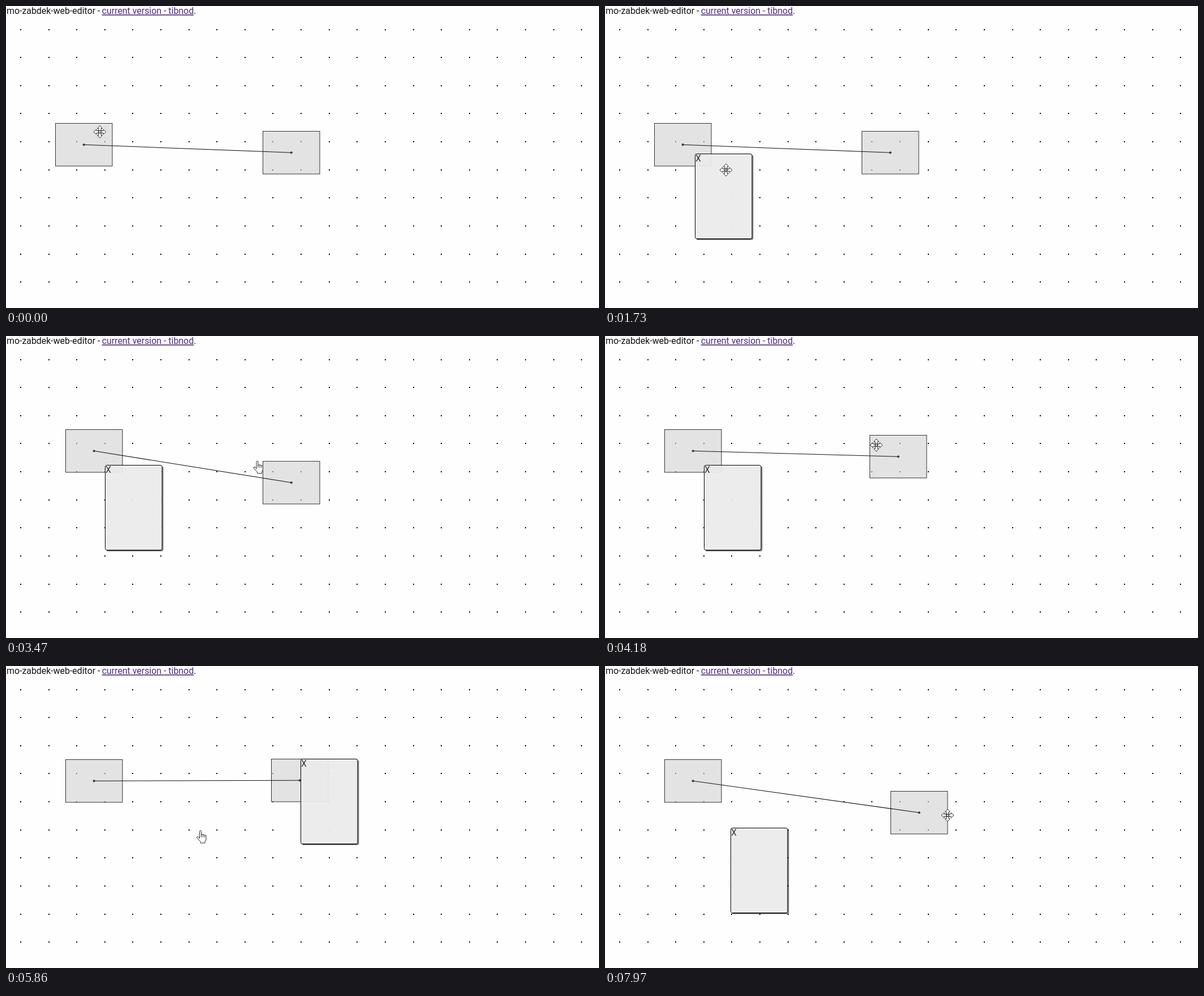
An HTML page for the animation above (8 s loop, 1049 px wide and 534 px high).

```html
<!DOCTYPE html>
<html lang="en">
<head>
<meta charset="utf-8">
<title>Box editor</title>
<style>
  html, body { margin: 0; width: 100%; height: 100%; overflow: hidden; background: #fefefe; }
  svg { display: block; width: 100%; height: 100%; }
  text { font: 15.9px Roboto, Arial, sans-serif; fill: #111; }
  .link { fill: #4f2a80; text-decoration: underline; }
  .box { fill: rgba(210, 210, 210, .6); stroke: #333; }
  .wire { stroke: #111; stroke-width: 1.1; }
  .end { fill: #333; }
  .shadow { fill: none; stroke: #222; stroke-width: 1.2; }
  .cursor path { fill: #fff; stroke: #2a2a33; stroke-linejoin: round; }
</style>
</head>
<body>
<svg viewBox="0 0 1049 534">
  <text x="1" y="14">mo-zabdek-web-editor -<tspan class="link" x="169.7">current version - tibnod</tspan>.</text>
  <path id="grid"/>
  <rect id="boxA" class="box" width="100.5" height="75.5"/>
  <rect id="boxB" class="box" width="100.5" height="75.5"/>
  <line id="wire" class="wire"/>
  <circle id="endA" class="end" r="2"/>
  <circle id="endB" class="end" r="2"/>
  <g id="panel">
    <path class="shadow" opacity=".4" d="M102.5 3.5V149Q102.5 152 99.5 152H3.5"/>
    <path class="shadow" opacity=".8" d="M101.5 2.5V148Q101.5 151 98.5 151H2.5"/>
    <rect width="100.5" height="150" rx="3" fill="rgba(235,235,235,.94)" stroke="#000"/>
    <text x=".5" y="13.5" style="fill:#333">X</text>
  </g>
  <g class="cursor">
    <path id="move"/>
    <g id="hand">
      <path d="M-1.5 14V1.5Q-1.5 0 0 0T1.5 1.5V8Q1.5 6.5 3 6.5T4.5 8Q4.5 7 6 7T7.5 8.5Q7.5 8 8.8 8T10 9.5V15Q10 17 8 19V22H0V19.5L-6 13Q-7.5 11 -5.5 10.5T-1.5 14Z"/>
      <path d="M1.5 8V12M4.5 8V12M7.5 8.5V12" style="fill:none"/>
    </g>
  </g>
</svg>
<script>
const LOOP = 8000, END = 7960, STEP = 60, PHASE = 40, GLIDE = 420;
const W = 100.5, H = 75.5, PANEL_H = 150;
const $ = id => document.getElementById(id);

// Pointer gestures: start time and goal; each eases for GLIDE ms or until the next one
const rest = [166, 222.5];
const gestures = [
  [40, 169, 217.5], [1060, 194, 236], [1360, 214, 290], [1720, 212, 298.5],
  [1960, 165.5, 214.5], [2440, 104, 109.5], [2740, 183.5, 172.5],
  [3280, 444.5, 221], [3460, 466, 239], [3640, 480, 193], [4540, 481, 195],
  [5080, 483.5, 218], [5320, 481, 182], [5440, 344, 291], [6160, 565, 215],
  [6460, 312, 342], [6940, 266, 337], [7180, 582, 181], [7600, 570, 207],
  [7780, 606, 264]
];

const startA = [87.5, 207.5], startB = [454.5, 221.5], panelGap = [52, 0];
const PANEL_ON_A = 820, PANEL_ON_B = 4540;

const ease = f => f * f * (3 - 2 * f);

function pointer(t) {
  let p = rest;
  for (let i = 0; i < gestures.length && gestures[i][0] <= t; i++) {
    const [start, x, y] = gestures[i];
    const next = i + 1 < gestures.length ? gestures[i + 1][0] : END;
    const f = ease(Math.min(1, (t - start) / Math.min(GLIDE, next - start)));
    p = [p[0] + (x - p[0]) * f, p[1] + (y - p[1]) * f];
  }
  return p;
}

// Distance dragged so far between two moments
function drag(t, from, to) {
  const a = pointer(from), b = pointer(Math.min(Math.max(t, from), to));
  return [b[0] - a[0], b[1] - a[1]];
}

const add = (...v) => v.reduce((s, p) => [s[0] + p[0], s[1] + p[1]]);
const snap = p => p.map(n => Math.floor(n + .01) + .5);
const inside = (p, o, h) => p[0] >= o[0] && p[0] <= o[0] + W && p[1] >= o[1] && p[1] <= o[1] + h;
const center = o => [o[0] + W / 2, o[1] + H / 2];
const place = (el, p) => el.setAttribute("transform", `translate(${p})`);
const show = (el, on) => el.setAttribute("visibility", on ? "visible" : "hidden");

function draw(time) {
  const t = Math.max(0, Math.floor((time - PHASE) / STEP) * STEP + PHASE);
  const p = pointer(t);
  const dragA = drag(t, 2440, 3280), dragB = drag(t, 3640, 5440);
  const a = snap(add(startA, dragA));
  const b = snap(add(startB, dragB, drag(t, 7780, END)));
  const panel = snap(t < PANEL_ON_B
    ? add(startA, panelGap, drag(t, 1360, 1960), dragA)
    : add(startB, panelGap, dragB, drag(t, 6460, 7180)));
  const open = t >= PANEL_ON_A;

  place($("boxA"), a);
  place($("boxB"), b);
  place($("panel"), panel);
  show($("panel"), open);

  const ca = center(a), cb = center(b);
  place($("endA"), ca);
  place($("endB"), cb);
  const ends = { x1: ca[0], y1: ca[1], x2: cb[0], y2: cb[1] };
  for (const k in ends) $("wire").setAttribute(k, ends[k]);

  const over = inside(p, a, H) || inside(p, b, H) || open && inside(p, panel, PANEL_H);
  for (const id of ["move", "hand"]) place($(id), p);
  show($("move"), over);
  show($("hand"), !over);
}

function buildGrid() {
  let d = "";
  for (let i = 0; i < 21; i++)
    for (let j = 0; j < 10; j++)
      d += `M${Math.round(24.9 + 49.62 * i)} ${Math.round(40.6 + 49.62 * j)}h2v2h-2z`;
  $("grid").setAttribute("d", d);
}

// Four closed arrows around a small square
function buildMoveCursor() {
  let arm = [[-2, -2], [-2, -6], [-4.5, -6], [0, -11], [4.5, -6], [2, -6], [2, -2]];
  let d = "";
  for (let i = 0; i < 4; i++) {
    d += `M${arm.join("L")}Z`;
    arm = arm.map(([x, y]) => [-y, x]);
  }
  $("move").setAttribute("d", d + "M-2 -2h4v4h-4z");
}

buildGrid();
buildMoveCursor();
const begin = performance.now();
function tick() {
  draw((performance.now() - begin) % LOOP);
  requestAnimationFrame(tick);
}
tick();
</script>
</body>
</html>
```
